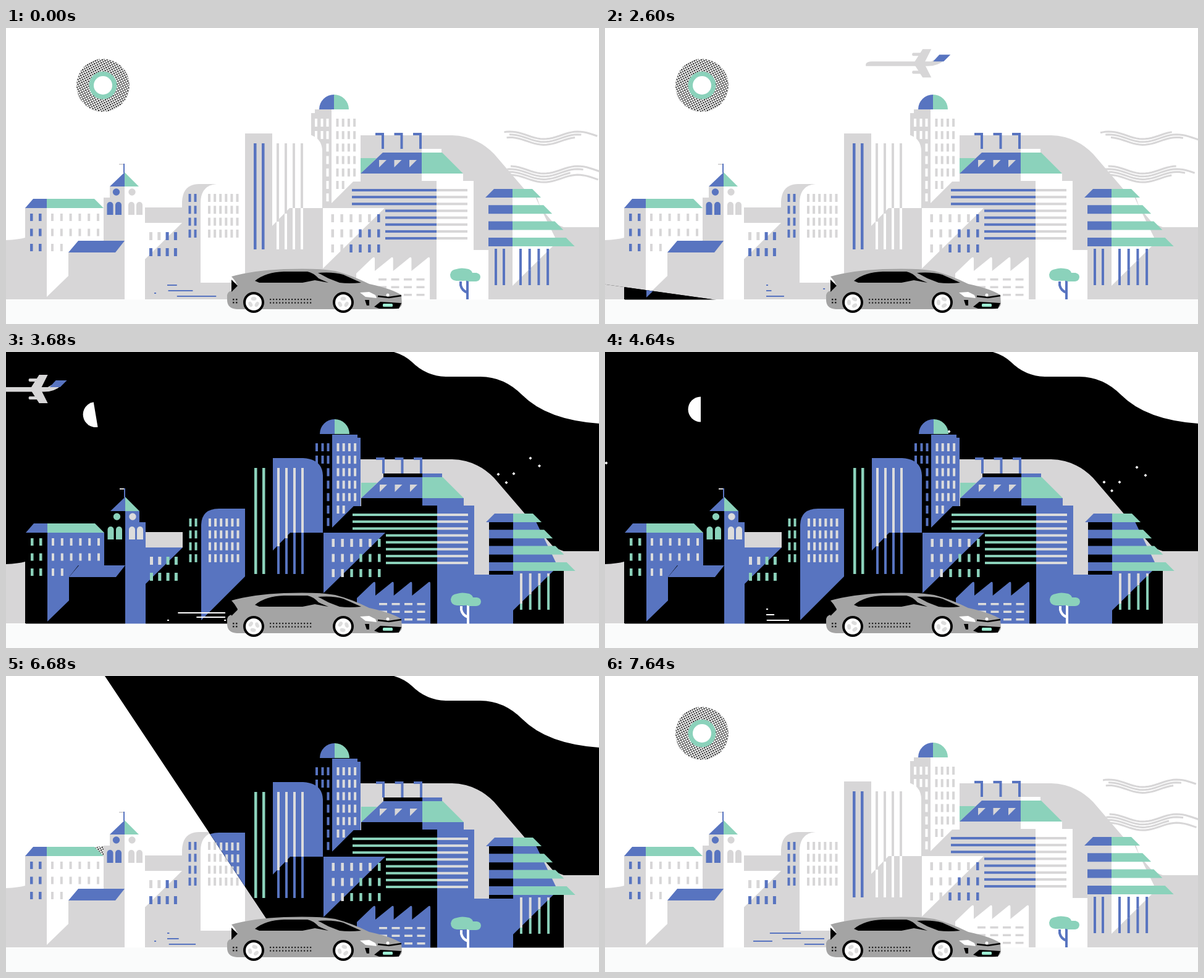
These frames come from a looping animation (960x480 px, 7680 ms). An HTML page:

```html
<!DOCTYPE html>
<html lang="en">
<head>
<meta charset="utf-8">
<title>City day and night</title>
<style>
html, body { margin: 0; width: 100%; height: 100%; overflow: hidden; background: #fff; }
svg { display: block; width: 960px; height: 480px; }
</style>
</head>
<body>
<svg id="stage" viewBox="0 0 960 480" xmlns="http://www.w3.org/2000/svg"></svg>
<script>
const LOOP = 7680, STREAK_LOOP = 512, PIVOT = { x: 481, y: 483 };
const GRAY = '#d7d6d7', BLUE = '#5874c0', GREEN = '#8bd2bb', CAR = '#a4a4a4';
const DAY = { face: '#fff', shade: GRAY, lit: GRAY, dim: BLUE, stilt: BLUE, trunk: BLUE };
const NIGHT = { face: BLUE, shade: '#000', lit: '#dcdcdc', dim: GREEN, stilt: '#dcdcdc', trunk: '#fff', dark: true };

const range = n => Array.from({ length: n }, (_, i) => i);
const repeat = (n, make) => range(n).map(make).join('');
const path = (fill, d) => `<path fill="${fill}" d="${d}"/>`;
const line = (color, width, d) => `<path fill="none" stroke="${color}" stroke-width="${width}" d="${d}"/>`;
const rect = (fill, x, y, w, h, r = 0) =>
  `<rect fill="${fill}" x="${x}" y="${y}" width="${w}" height="${h}" rx="${r}"/>`;
const disc = (fill, x, y, r) => `<circle fill="${fill}" cx="${x}" cy="${y}" r="${r}"/>`;
// Four-sided shape with level top (x1..x2) and level foot (x3..x4).
const trap = (fill, y, x1, x2, h, x3, x4) => path(fill, `M${x1} ${y}H${x2}L${x4} ${y + h}H${x3}Z`);
// Window rows; fill may depend on the window position.
const windows = (fill, x, cols, dx, y, rows, dy, w = 4, h = 13) =>
  repeat(cols, i => repeat(rows, j => {
    const wx = x + dx * i, wy = y + dy * j;
    return rect(fill.call ? fill(wx, wy) : fill, wx, wy, w, h);
  }));
// Windows right of a falling diagonal lie in the shade.
const acrossShade = (c, sum) => (x, y) => x + y > sum ? c.dim : c.lit;
// Upright bar that changes colour at height cut.
const splitBar = (top, foot, x, y1, cut, y2) =>
  rect(top, x, y1, 4, cut - y1) + rect(foot, x, cut, 4, y2 - cut);

function townHall(c) {
  return rect(c.shade, 31, 291, 35, 149) + rect(c.shade, 66, 364, 126, 76) +
    path(c.face, 'M66 292H158V345H116L101 364V402L66 436Z') +
    trap(BLUE, 277, 44, 66, 15, 31, 66) + trap(GREEN, 277, 66, 143, 15, 66, 158) +
    windows(c.dim, 39, 2, 14, 301, 3, 24.5, 4.5, 12) +
    windows(c.lit, 73, 6, 14.8, 301, 2, 24.5, 4, 12) + windows(c.lit, 73, 2, 14.8, 350, 1, 0, 4, 12);
}

function clockTower(c) {
  const arch = (fill, x) => path(fill, `M${x} 303V287a5 5 0 0 1 10 0V303Z`);
  return rect(c.shade, 168, 257, 24, 18) + rect(c.shade, 158, 275, 34, 89) +
    trap(BLUE, 345, 117, 192, 19, 101, 177) +
    path(c.face, 'M192 257H215V275H225V440H192Z') +
    trap(BLUE, 234, 192, 192, 23, 168, 192) + trap(GREEN, 234, 192, 192, 23, 192, 215) +
    line(BLUE, 2, 'M191 235V220') + line(GRAY, 2, 'M183 221H190') +
    disc(c.dim, 178.5, 266, 5.7) + disc(c.lit, 204, 266, 5.7) +
    repeat(2, i => arch(c.dim, 163.5 + 13.5 * i) + arch(c.lit, 198 + 13 * i));
}

function flats(c) {
  return rect(GRAY, 225, 291, 60, 25) + rect(c.shade, 225, 316, 60, 124) +
    trap(c.face, 316, 225, 285, 59, 225, 225) +
    windows(acrossShade(c, 584), 232, 4, 13.3, 331, 2, 26, 5) +
    path(c.shade, 'M285 440V282Q286 253 313 253H387V440Z') +
    path(c.face, c.dark ? 'M315 434V279Q316 253 344 253H386V363Z'
                        : 'M315 413V284Q315 255 341 253H387V413Z') +
    windows(c.dim, 295.5, 2, 9, 269, 4, 19.3) + windows(c.lit, 327, 6, 9.1, 269, 4, 19.3);
}

function towers(c) {
  return rect(c.shade, 387, 171, 44, 269) +
    rect(c.shade, 500, 132, 27, 160) + rect(c.shade, 494, 138, 33, 154) +
    path(c.face, 'M527 133H568V138H573V249H562L527 284Z') +
    path(c.shade, 'M527 284L562 249H574V236H673V248H697V440H431V292H527Z') +
    windows(c.face, 500, 2, 9.5, 147, 2, 20) + windows(c.face, 518.5, 1, 0, 147, 7, 20.2) +
    windows(c.lit, 534.5, 4, 9.2, 147, 5, 20.2) + windows(c.lit, 534.5, 2, 9.2, 248, 1, 0) +
    path(c.face, 'M431 171H480Q511 173 512 199V292H459L431 321Z') +
    windows(c.dim, 401, 2, 13, 187, 1, 0, 4.5, 172) +
    repeat(4, i => splitBar(c.lit, c.face, 438 + 13 * i, 187, Math.max(292, 314 - 13 * i), 359)) +
    path(BLUE, 'M507 132a24 24 0 0 1 24 -24v24Z') + path(GREEN, 'M531 108a24 24 0 0 1 24 24h-24Z');
}

function works(c) {
  const yard = c.dark ? 820 : 781;
  const tooth = i => {
    const x = 597 + 29.7 * i;
    return `L${x - 5} 374Q${x} 369 ${x} 375V394`;
  };
  return trap(GREEN, 211, 574, 600, 25, 574, 574) + rect(c.shade, 610, 196, 63, 6) +
    rect(c.face, 673, 196, 32, 6) +
    repeat(3, i => line(BLUE, 4, `M${598 + 30.5 * i} 172h12v24`)) +
    trap(BLUE, 202, 610, 673, 34, 574, 673) + trap(GREEN, 202, 673, 706, 34, 673, 740) +
    repeat(3, i => trap(GRAY, 214, 604 + 24.5 * i, 616 + 24.5 * i, 12, 604 + 24.5 * i, 604 + 24.5 * i)) +
    path(c.face, `M673 236H740V248H757V360H${yard}V440H697V248H673Z`) +
    repeat(8, i => {
      const x = i < 3 ? 560 : 614, y = 261 + 11.15 * i;
      return rect(c.dim, x, y, 697 - x, 4) + rect(c.lit, 697, y, 50, 4);
    }) +
    trap(c.face, 292, 513, 613, 98, 513, 513) +
    windows(acrossShade(c, 895), 526.5, 6, 14.9, 302, 3, 24.5, 4.5) +
    path(c.face, `M567 440V398${repeat(4, tooth)}V440Z`) +
    windows(c.lit, 603, 4, 20.5, 406, 3, 12.5, 13, 3.5);
}

function terraces(c) {
  const slab = i => {
    const y = 261 + 26.3 * i, end = 866 + 18.2 * i;
    return trap(BLUE, y, i ? 781 : 790, 820, 14, i ? 781 : 776, 820) +
      trap(GREEN, y, 820, end - 14, 14, 820, end);
  };
  return rect(c.shade, 781, 270, 39, c.dark ? 90 : 170) +
    path(c.shade, 'M820 270H858L886 353H902V440H820Z') +
    path(c.face, 'M820 270H855L889 340L886 353L820 418Z') +
    (c.dark ? '' : windows(BLUE, 791, 2, 13, 358, 1, 0, 4, 59)) +
    repeat(4, i => splitBar(c.stilt, c.dim, 831 + 14.7 * i, 358, Math.max(358, 407 - 14.7 * i), 417)) +
    repeat(4, slab) +
    line(c.trunk, 4, 'M747 440V409M736 411V417Q738 426 747 429') +
    path(GREEN, 'M729 391Q737 388 749 391Q754 393 755 397H761Q768 398 768 404Q767 411 760 411H749Q745 409 740 410H729Q719 409 719 400Q720 392 729 391Z');
}

const city = c => [townHall, clockTower, flats, towers, works, terraces].map(part => part(c)).join('');

const hills = path(GRAY, 'M0 344Q20 343 31 340V440H0Z') +
  path(GRAY, 'M574 174H722Q762 175 790 204L887 317L903 323H960V440H574Z');

// Two wind bands of three and four parallel waves.
const wave = y => `<polyline class="wave" fill="none" stroke="${GRAY}" stroke-width="3" points="` +
  repeat(45, i => `${750 + 5 * i},${(y - 6 * Math.cos((5 * i - 66) * Math.PI / 55)).toFixed(1)} `) + '"/>';
const wind = repeat(3, i => wave(174 + 4.7 * i)) + repeat(4, i => wave(230 + 4.7 * i));

const star = (x, y) => path('#fff', `M${x} ${y - 2.5}l2.5 2.5l-2.5 2.5l-2.5 -2.5Z`);
const stars = repeat(3, i => star(808 + 12.5 * i, i % 2 ? 225 : 211)) +
  repeat(2, i => star(861 + 14 * i, 187 + 13 * i)) + star(557, 129) + star(2, 180);

const wheel = x => disc('#000', x, 445, 17) + disc('#fff', x, 445, 13) +
  `<g class="hub" data-x="${x}">` + repeat(3, i =>
    `<ellipse cx="${x}" cy="439" rx="4.5" ry="3" fill="#ddd" transform="rotate(${120 * i} ${x} 445)"/>`) + '</g>';

const car = path(CAR, 'M365 403Q400 393 450 391Q505 389 533 394Q560 401 588 415Q625 423 640 433L641 447Q640 456 626 456H374Q358 455 358 441V433Q359 427 366 426L375 417L370 409Z') +
  path('#000', 'M365 408L375 418L365 428Z') +
  path('#000', 'M403 410Q420 396 450 395H488Q498 397 506 406L522 413L500 409L480 413H410Z') +
  path('#000', 'M505 397Q530 395 546 400L575 413Q555 415 540 413L522 406Z') +
  `<path id="glare" fill="#e2e2e4" d="M509 397Q530 396 545 400L573 413Q552 414 541 412L523 404Z"/>` +
  windows('#222', 427, 14, 5, 439, 2, 5.5, 2.2, 2.2) +
  windows('#222', 367, 2, 5, 439, 2, 5, 2.5, 2.5) +
  path('#fff', 'M573 429L588 428L598 433L600 438L582 436Z') +
  line('#000', 2.5, 'M602 435L620 437L640 434') + disc('#fff', 618, 433, 2.5) +
  path('#000', 'M581 441H588V450H584Z') + path('#000', 'M596 452L606 444L640 446L636 455H604Z') +
  rect('#9cecd2', 610, 447, 16, 5, 1.5) + wheel(401) + wheel(546);

const wing = path(GRAY, 'M78 22L92 0H106L95 22Z') + rect(GRAY, 75, 6, 16, 5, 2);
const plane = path(GRAY, 'M0 24Q2 20 10 20H106L113 16L127 18Q117 27.5 100 27.5H0Z') +
  trap(BLUE, 9, 119, 137, 11, 109, 126) + wing + `<g transform="translate(0 46) scale(1 -1)">${wing}</g>`;

const speed = color => `<path class="speed" fill="none" stroke="${color}" stroke-width="2.2"/>`;

const svg = document.getElementById('stage');
svg.innerHTML = `<defs>
  <clipPath id="dark"><polygon id="wedge"/></clipPath>
  <pattern id="dots" width="5" height="5" patternUnits="userSpaceOnUse" patternTransform="rotate(18)">
    ${rect('#111', 0, 0, 2.1, 2.1) + rect('#111', 2.5, 2.5, 2.1, 2.1)}</pattern></defs>
  ${rect('#fff', 0, 0, 960, 480)}
  <g id="sun">${disc('url(#dots)', 0, 0, 43) + disc(GREEN, 0, 0, 22.5) + disc('#fff', 0, 0, 15)}</g>
  ${wind}${hills}${city(DAY)}${speed(BLUE)}
  <g clip-path="url(#dark)">
    ${path('#000', 'M0 0H628Q645 5 657 16Q680 39 712 40H768Q806 40 836 70Q876 110 960 116V440H0Z')}
    <g id="stars">${stars}</g>
    <path id="moon" fill="#fff" d="M155 72.5A20.5 20.5 0 0 0 155 113.5Z"/>
    ${hills}<g transform="translate(1 1)">${city(NIGHT)}</g>
    ${speed('#fff')}
  </g>
  ${rect('#fafbfb', 0, 440.5, 960, 40)}
  <g id="plane">${plane}</g>${car}`;

const $ = id => document.getElementById(id);
const all = name => [...svg.querySelectorAll('.' + name)];
const waves = all('wave'), hubs = all('hub'), speeds = all('speed');
const move = (el, value) => el.setAttribute('transform', value);
const show = (el, on) => { el.style.display = on ? '' : 'none'; };
const span = (t, start, length) => Math.min(1, Math.max(0, (t - start) / length));
const outQuad = p => p * (2 - p);
const inOut = p => p < .5 ? 2 * p * p : 1 - 2 * (1 - p) ** 2;
const rest = (t, start, length) => (1 - span(t, start, length)) ** 3;
const swing = (x, y, angle) => `rotate(${angle} ${x} ${y})`;

// Streaks leave the car in two bursts; head and tail both slow down to the left.
const streakRows = [430, 417, 426, 435, 423, 430, 435, 416];
function streak(y, i, t) {
  const burst = i > 3, start = 370 + 28 * i + 70 * burst, tailStart = start + 50 + 40 * burst;
  const age = (t - start + 2 * STREAK_LOOP) % STREAK_LOOP + start;
  if (age > tailStart + 120) return '';
  const left = i ? 261 : 240, at = p => 355 - (355 - left) * outQuad(p);
  const head = at(span(age, start, 100)), tail = at(span(age, tailStart, 110));
  return `M${head} ${y}H${Math.max(head + 3, tail)}`;
}

// Night sweeps in from the left, then day follows the same way round.
function wedge(t) {
  const end = 180 * inOut(span(t, 2440, 1083)), start = 180 * inOut(span(t, 6400, 710));
  return `${PIVOT.x},${PIVOT.y} ` + repeat(5, i => {
    const a = (start + (end - start) * i / 4) * Math.PI / 180;
    return `${PIVOT.x - 2000 * Math.cos(a)},${PIVOT.y - 2000 * Math.sin(a)} `;
  });
}

function draw(t) {
  $('wedge').setAttribute('points', wedge(t));
  const sunY = t > 3600 ? 380 - 287 * outQuad(span(t, 6600, 720)) : 93;
  move($('sun'), `translate(157 ${sunY})`);

  const leave = t > 6400 ? 35 * ((t - 6400) / 280) ** 2 : 0;
  const tilt = 43 * span(t, 6080, 320) ** 2 - 250 * rest(t, 3000, 1000);
  move($('moon'), swing(PIVOT.x, PIVOT.y, leave - 45 * rest(t, 3000, 1000)) + swing(155, 93, tilt));
  move($('stars'), swing(PIVOT.x, PIVOT.y, leave - 21 * rest(t, 3000, 1300)));
  show($('stars'), t > 3280);

  const flight = t - 1720;
  move($('plane'), `translate(${798 - .4265 * flight} ${32 + .0026 * flight})`);
  show($('plane'), t > 1300 && t < 4000);
  show($('glare'), t % 2560 > 400 && t % 2560 < 680);

  waves.forEach((w, i) => {
    const sway = Math.sin(t / LOOP * 4 * Math.PI + i * 2);
    const start = 58 + 4 * (i % 4) + 5 * sway, length = 130 + 25 * Math.cos(i * 2 + t / LOOP * 4 * Math.PI);
    w.setAttribute('stroke-dasharray', `0 ${start} ${length} 999`);
  });
  hubs.forEach(h => move(h, swing(h.dataset.x, 445, t * 360 / STREAK_LOOP)));
  const d = streakRows.map((y, i) => streak(y, i, t)).join('');
  speeds.forEach(s => s.setAttribute('d', d));
}

const begin = performance.now();
function tick() {
  draw((performance.now() - begin) % LOOP);
  requestAnimationFrame(tick);
}
tick();
</script>
</body>
</html>
```
